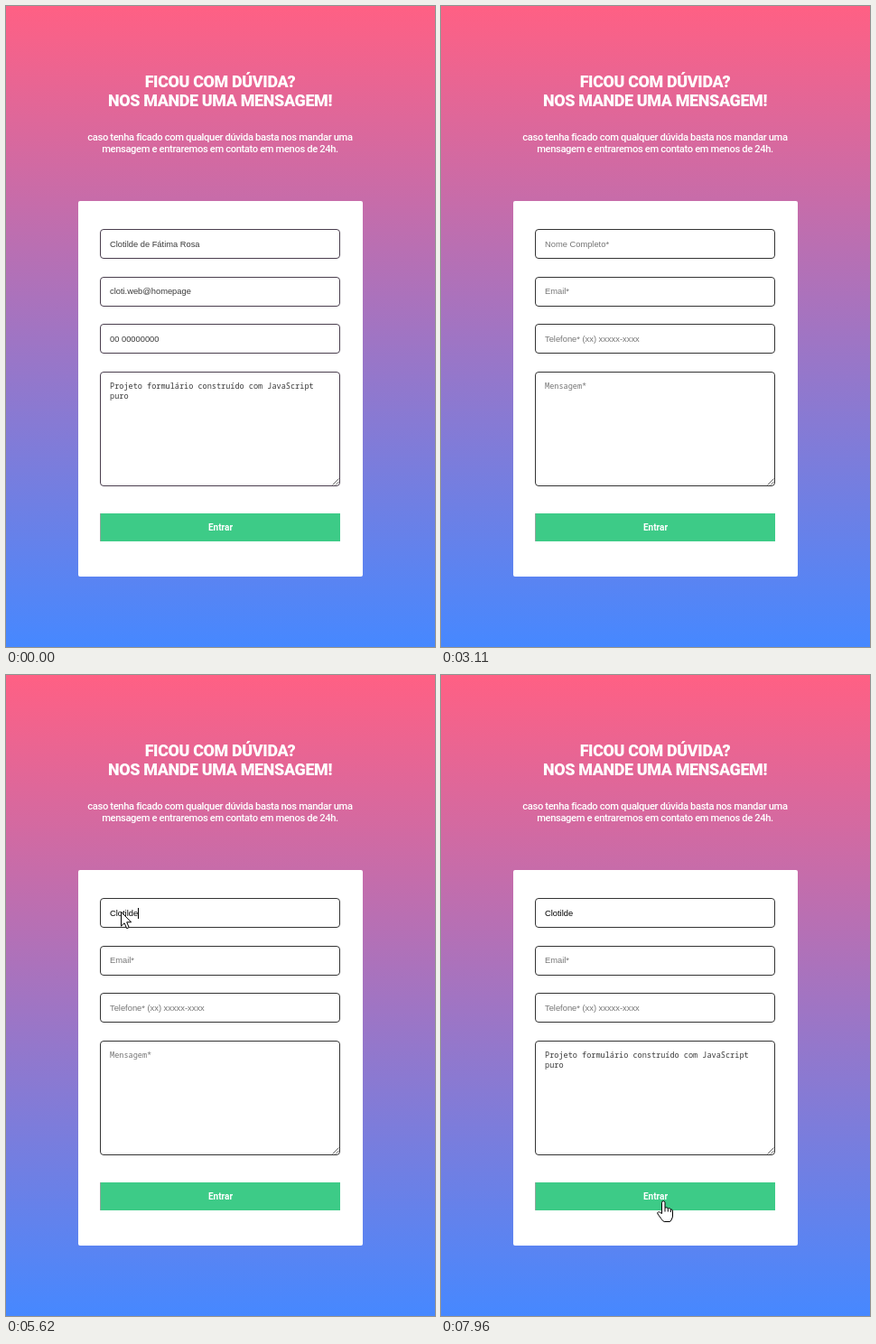
An HTML page that plays this animation: 475 px wide and 710 px high, repeating every 8000 ms.

```html
<!DOCTYPE html>
<html lang="pt-BR">
<head>
<meta charset="utf-8">
<title>Formulário de contato</title>
<style>
  html, body { margin: 0; width: 100%; height: 100%; overflow: hidden; }
  body { position: relative; background: linear-gradient(#ff6084, #4688ff); }
  body > * { position: absolute; box-sizing: border-box; margin: 0; }
  h1, p { left: 0; width: 474px; color: #fff; text-align: center; white-space: nowrap; font-family: Roboto, sans-serif; }
  h1 { top: 73px; font-size: 17.92px; line-height: 21px; font-weight: 900; letter-spacing: -.35px; }
  p { top: 138.5px; font-size: 11.2px; line-height: 13px; font-weight: 500; letter-spacing: -.37px; }
  .card { left: 80px; top: 216px; width: 315px; height: 416px; border-radius: 2px; background: #fff; }
  .field {
    top: calc(247px + 52.5px * var(--row)); left: 104px; width: 266px; height: 33px; padding-left: 10px;
    border: 1px solid; border-radius: 4px;
    display: flex; align-items: center; white-space: pre;
    font: 9.333px "Liberation Sans", Arial, sans-serif;
  }
  .area { height: 127px; padding-top: 10.5px; align-items: flex-start; font: 8.55px/11px "Noto Sans Mono", monospace; }
  .area svg { position: absolute; right: 0; bottom: 0; }
  .caret { width: 1px; height: 12px; margin-right: -1px; background: #000; }
  .button {
    left: 104px; top: 562px; width: 266px; height: 31px; background: #3dcb87;
    border: solid #8fa79b; border-width: 0 0 0 1px;
    color: #fff; font: 700 10px/31px Roboto, sans-serif; text-align: center;
  }
  #pointer { left: 0; top: 0; width: 30px; height: 30px; overflow: visible; pointer-events: none; }
</style>
</head>
<body>
<h1>FICOU COM DÚVIDA?<br>NOS MANDE UMA MENSAGEM!</h1>
<p>caso tenha ficado com qualquer dúvida basta nos mandar uma<br>mensagem e entraremos em contato em menos de 24h.</p>
<div class="card"></div>
<div class="field" style="--row:0"><span></span><i class="caret"></i></div>
<div class="field" style="--row:1"><span></span></div>
<div class="field" style="--row:2"><span></span></div>
<div class="field area" style="--row:3"><span></span>
  <svg width="8" height="8" stroke="#555" stroke-width=".9"><path d="M.5 7.5 7.5 .5M4 7.5 7.5 4"/></svg>
</div>
<div class="button">Entrar</div>
<svg id="pointer" stroke="#000" stroke-linejoin="round">
  <path id="arrow" d="M.5 .5V16.2L4.1 12.8 6.7 18.7 9.2 17.6 6.7 11.8H11.6Z" fill="#fff"/>
  <path id="beam" d="M-3.5-7H-1Q0-7 0-6Q0-7 1-7H3.5M0-6V6M-3.5 7H-1Q0 7 0 6Q0 7 1 7H3.5" fill="none" stroke-width="1.2"/>
  <g id="hand">
    <path transform="translate(-7)" fill="#fff" d="M5.5 14.5V2.5Q5.5 .7 7.2 .7Q9 .7 9 2.5V8.6Q9.6 7.6 10.9 7.8Q12.2 8 12.3 9.2Q13.2 8.3 14.3 8.8Q15.2 9.2 15.3 10.2Q16 9.6 16.9 10.2Q17.6 10.7 17.5 12V17Q17.5 19 16.3 21Q15.5 23.5 14 23.5H8.2Q6.5 23 5 20.5L1 15Q.2 13.6 1.4 12.9Q2.6 12.4 3.6 13.4Z"/>
    <path d="M2 8.6V12.5M5.3 9.2V12.5M8.3 10.2V13" fill="none"/>
  </g>
</svg>
<script>
const LOOP = 8000, STEP = 100;
const SUBMIT = 2010, RESET = 3110, FOCUS = 4330, TYPE = 4530, BLUR = 6430, PASTE = 7350;
const KEY_GAP = 155;

const $ = s => document.querySelector(s);
const fields = [...document.querySelectorAll('.field')];
const spans = fields.map(f => f.querySelector('span'));
const caret = $('.caret'), pointer = $('#pointer');

const name = 'Clotilde';
const message = 'Projeto formulário construído com JavaScript\npuro';
const filled = [name + ' de Fátima Rosa', 'cloti.web@homepage', '00 00000000', message];
const hints = ['Nome Completo*', 'Email*', 'Telefone* (xx) xxxxx-xxxx', 'Mensagem*'];

const slow = s => 1 - (1 - s) ** 2;
const overshoot = s => Math.sin(2 * s) / Math.sin(2);

const nameSpot = [129.5, 264], messageSpot = [139.5, 420];
const moves = [
  { at: 200, end: 590, from: [347, 700], to: [251, 636], ease: slow },
  { at: 790, end: 890, from: [245, 584], to: [241, 574], ease: slow },
  { at: SUBMIT + STEP, hidden: true },
  { at: RESET + STEP, end: 3810, from: [97, 306], to: nameSpot, ease: slow },
  { at: 4720, to: [127, 262], shape: 'arrow' },
  { at: 5820, to: nameSpot },
  { at: 6330, end: 7050, from: [127, 270], to: messageSpot, ease: overshoot, sway: -14 },
  { at: 7250, end: 7960, from: messageSpot, to: [246, 582], ease: overshoot }
];

// the pointer jumps once per step, as in a screen recording
function place(m, t) {
  if (!m.end || t >= m.end) return m.to;
  const n = Math.round((m.end - m.at) / STEP);
  const s = Math.floor((t - m.at) / (m.end - m.at) * n + .02) / n;
  const k = m.ease(s);
  const [x, y] = m.from.map((a, i) => a + (m.to[i] - a) * k);
  return [x + (m.sway || 0) * Math.sin(2 * Math.PI * k), y];
}

function shapeAt(x, y) {
  const el = document.elementFromPoint(x, y);
  if (el && el.closest('.button')) return 'hand';
  return el && el.closest('.field') ? 'beam' : 'arrow';
}

function drawPointer(t) {
  const m = moves.filter(m => t >= m.at).pop();
  const shown = m && !m.hidden;
  pointer.style.display = shown ? 'block' : 'none';
  if (!shown) return;
  const [x, y] = place(m, t);
  const shape = m.shape || shapeAt(x, y);
  pointer.style.transform = `translate(${x}px,${y}px)`;
  for (const g of pointer.children) g.style.display = g.id === shape ? 'inline' : 'none';
}

function drawFields(t) {
  const reset = t >= RESET;
  const typed = name.slice(0, Math.max(0, Math.floor((t - TYPE) / KEY_GAP) + 1));
  const values = reset ? [typed, '', '', t >= PASTE ? message : ''] : filled;
  const valid = Math.min(3, Math.max(0, Math.floor((t - SUBMIT) / STEP) + 1)) / 3;
  const border = reset ? '#333' : `color-mix(in srgb, #28c35a ${valid * 100}%, #4a3e4e)`;

  fields.forEach((f, i) => {
    const text = values[i] || hints[i];
    if (spans[i].textContent !== text) spans[i].textContent = text;
    spans[i].style.color = !values[i] ? '#757575' : values[i] === typed ? '#000' : '#3a3a3a';
    f.style.borderColor = border;
  });

  // an empty field shows the caret in front of its hint
  caret.style.display = t >= FOCUS && t < BLUR ? 'block' : 'none';
  caret.style.order = typed ? 0 : -1;
}

const begin = performance.now();
function tick() {
  const t = (performance.now() - begin) % LOOP;
  drawFields(t);
  drawPointer(t);
  requestAnimationFrame(tick);
}
tick();
</script>
</body>
</html>
```
